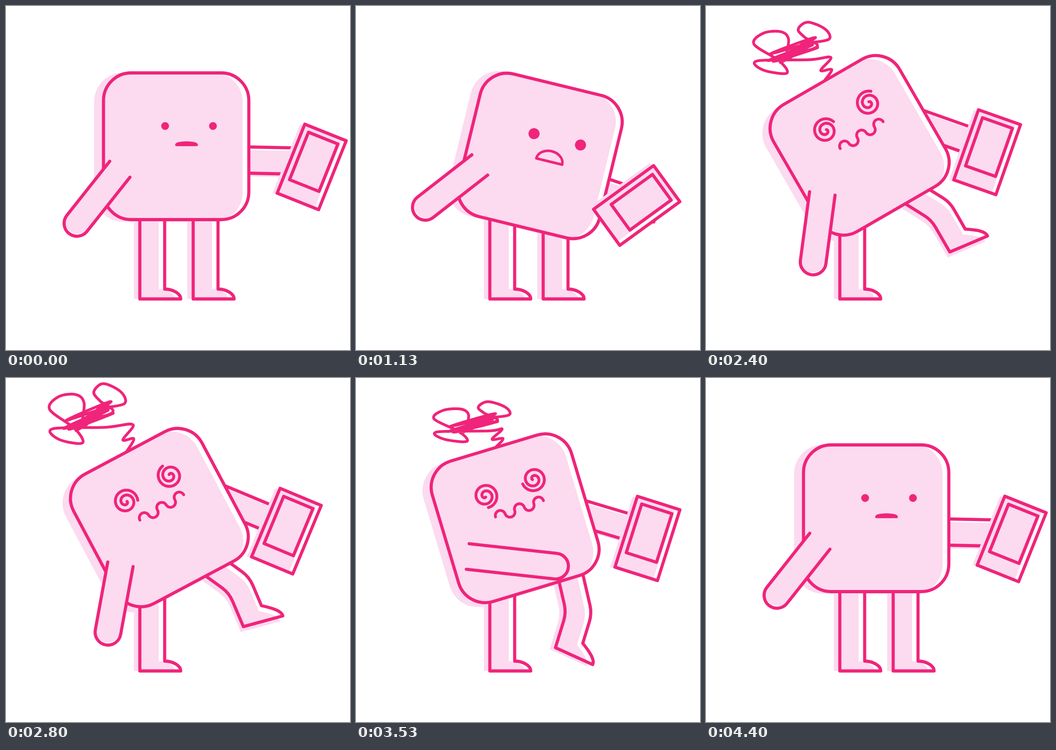
An HTML page with a canvas for the animation above (6140 ms loop, 748 by 748 pixels).

```html
<!DOCTYPE html>
<html lang="en">
<head>
<meta charset="utf-8">
<title>Dizzy</title>
<style>
html, body { margin: 0; height: 100%; overflow: hidden; background: #fff; }
canvas { display: block; }
</style>
</head>
<body>
<canvas id="stage" width="748" height="748"></canvas>
<script>
const c = document.getElementById('stage').getContext('2d');
const INK = '#f0247a', TINT = '#fcdaf0', RAD = Math.PI / 180, TAU = 2 * Math.PI;
const LOOP = 6140, LAST = 44;

// Body x, y, tilt | far arm height, angle, reach, grip | near arm angle |
// knee x, y, thigh angle, bend | eye radius | tangle height
const rest  = [370, 305, 0,        30, 1.2, 138.5, 20.6,  128.4,  434, 550, 0, 0,     8.5, 0];
const look  = [400, 326, 13.7,     42, 5, 74, 35.3,       128.4,  434, 550, 0, 0,     12, 0];
const reel  = [313.5, 287.5, -31,  -6, -39.2, 85.5, 37.2, 128,    449, 538, -11, 0,   17, .92];
const kick  = [334, 303, -30,      46, 49.4, 130, 0,      127.6,  510, 446, -58, 28,  26, .86];
const sway  = [333.5, 303.5, -28,  49, 50.6, 129.3, 0,    128.4,  507, 450, -54, 31,  26, 1];
const swing = [346, 305, -16.7,    41, 33.3, 135, 1,      23,     485, 511, -13, 30,  26, .67];
const acts = [[0, rest], [6, look], [14, look], [19, reel], [24, kick], [28, sway], [35, swing], [43, rest]];

const mix = (a, b, k) => a + (b - a) * k;
const clamp = x => Math.max(0, Math.min(1, x));
const turn = (x, y, deg) => {
  const s = Math.sin(deg * RAD), k = Math.cos(deg * RAD);
  return [x * k - y * s, x * s + y * k];
};

// Smooth interpolation that never overshoots a key pose
function poseAt(t) {
  if (t >= acts.at(-1)[0]) return rest;
  const i = acts.findLastIndex(a => a[0] <= t);
  const h = acts[i + 1][0] - acts[i][0], u = (t - acts[i][0]) / h;
  return rest.map((_, j) => {
    const slope = k => (acts[k + 1][1][j] - acts[k][1][j]) / (acts[k + 1][0] - acts[k][0]);
    const tangent = k => {
      if (k < 1 || k > acts.length - 2) return 0;
      const p = slope(k - 1), q = slope(k);
      return p * q > 0 ? 2 * p * q / (p + q) : 0;
    };
    return mix(acts[i][1][j], acts[i + 1][1][j], u * u * (3 - 2 * u)) +
      h * u * (1 - u) * ((1 - u) * tangent(i) - u * tangent(i + 1));
  });
}

function place(x, y, deg, draw) {
  c.save();
  c.translate(x, y);
  c.rotate(deg * RAD);
  draw();
  c.restore();
}

function fill(path, dx = 0, dy = 0, color = TINT) {
  c.fillStyle = color;
  place(dx, dy, 0, () => c.fill(path));
}

function line(path, width = 6.8) {
  c.lineWidth = width;
  c.stroke(path);
}

function box(x, y, w, h, r = 0) {
  const p = new Path2D();
  p.roundRect(x - w / 2, y - h / 2, w, h, r);
  return p;
}

// Tangle: a zigzag stem, two loops on the left, a random core, one loop on the right
let seed = 7;
const random = () => (seed = seed * 16807 % 2147483647) / 2147483647;
const core = Array.from({ length: 15 }, (_, i) => {
  const side = i % 2 ? 1 : -1;
  return [-80 + side * mix(15, 60, random()), -76 - side * mix(5, 30, random()) + mix(-12, 12, random())];
});
const tangle = [
  [0, 0], [16, -28], [-8, -26], [14, -59], [-47, -53],
  [-160, -50], [-147, -27], [-96, -19], [-112, -50],
  [-167, -92], [-147, -120], [-109, -124], [-92, -105],
  ...core, [-30, -86],
  [-57, -110], [-71, -130], [-50, -148], [-12, -130], [-4, -105], [-47, -96]];

function drawTangle(height) {
  if (height < .05) return;
  const wide = Math.min(1, height * 1.5), path = new Path2D();
  const p = tangle.map(([x, y], i) => [x * wide + (i > 3 ? (1 - height) * 100 * wide : 0), y * height]);
  path.moveTo(...p[0]);
  p.slice(0, -1).forEach((b, i) => {
    const a = p[i - 1] || b, d = p[i + 1], e = p[i + 2] || d;
    path.bezierCurveTo(b[0] + (d[0] - a[0]) / 6, b[1] + (d[1] - a[1]) / 6,
      d[0] - (e[0] - b[0]) / 6, d[1] - (e[1] - b[1]) / 6, ...d);
  });
  line(path, 6);
}

function drawLeg(x, y, thigh, bend) {
  const shin = thigh + bend, half = 27, knee = half / Math.cos(bend / 2 * RAD);
  const heel = turn(-half, 87, shin);
  const foot = (fx, fy) => turn(fx, fy, shin + bend / 4).map((v, i) => v + heel[i]);
  const ankle = turn(half, 65.5 - bend / 6, shin);
  const hip = turn(half, -160, thigh);
  const p = new Path2D();
  p.moveTo(...turn(-half, -160, thigh));
  p.arcTo(...turn(-knee, 0, thigh + bend / 2), ...heel, 70);
  p.lineTo(...heel);
  p.lineTo(...foot(89, 0));
  p.bezierCurveTo(...foot(89, -11), ...foot(74, -21), ...ankle);
  p.arcTo(...turn(knee, 0, thigh + bend / 2), ...hip, 70);
  p.lineTo(...hip);
  place(x, y, 0, () => {
    fill(p, ...turn(-13, 0, thigh * 1.2));
    line(p);
  });
}

function drawFarArm(y, deg) {
  const half = 28.5 / Math.cos(deg * RAD), [dx, dy] = turn(118, 0, deg);
  const p = new Path2D();
  p.moveTo(0, -half);
  p.lineTo(dx, dy - half);
  p.lineTo(dx, dy + half);
  p.lineTo(0, half);
  place(157, y, 0, () => {
    fill(p, 0, 7);
    line(p);
  });
}

function drawPhone(y, deg, reach, grip) {
  const [dx, dy] = turn(reach, 0, deg + 5), shell = box(0, 0, 97, 161.5);
  place(157 + dx, y + dy, deg + grip, () => {
    fill(shell, 0, 0, '#fff');
    fill(shell, -9.5, 3.5);
    line(shell);
    line(box(0, -12, 69, 111));
  });
}

function drawNearArm(deg) {
  const length = mix(192, 150, (deg - 23) / 105.4);
  const arm = len => {
    const p = new Path2D();
    p.moveTo(0, -28);
    p.lineTo(len, -28);
    p.arc(len, 0, 28, -TAU / 4, TAU / 4);
    p.lineTo(0, 28);
    return p;
  };
  place(-122.5, 50, deg, () => {
    fill(arm(length - 5), 0, 2);
    line(arm(length));
  });
}

function spiral(x, y, r, deg) {
  const p = new Path2D();
  for (let u = 0; u <= 1; u += 1 / 80) {
    const [dx, dy] = turn(r * (1 - .9 * u ** 1.4), 0, deg - 720 * u);
    p.lineTo(x + dx, y + dy);
  }
  line(p, mix(3, 6.2, r / 26));
}

function drawFace(t, eye) {
  const mouth = new Path2D(), spread = clamp((eye - 14) / 12), open = clamp((eye - 8.5) / 3.5);
  const left = [mix(-24, -48, spread), mix(-44, -65, spread)];
  const right = [mix(80, 63, spread), mix(-44, -70, spread)];
  if (eye > 13) {
    spiral(...left, eye, 10 * (t - 24) - 18);
    spiral(...right, eye, -12.6 * (t - 24) - 49);
    for (let i = 0; i < 5; i++)
      mouth.arc(-29 + 22 * i, -15 - i, 11, TAU / 2, 0, i % 2 === 1);
    line(mouth, 6);
    return;
  }
  for (const spot of [left, right]) {
    const p = new Path2D();
    p.arc(...spot, eye, 0, TAU);
    fill(p, 0, 0, INK);
  }
  mouth.ellipse(22.5, mix(-3, 7, open), mix(22, 29, open), mix(5, 23, open), 0, TAU / 2, TAU);
  mouth.closePath();
  line(mouth, 5.5);
}

function draw(t) {
  const [x, y, tilt, armY, armDeg, reach, grip, nearDeg, kneeX, kneeY, thigh, bend, eye, height] = poseAt(t);
  const shape = box(0, 0, 316, 319, 60), shade = box(-17, 2, 323, 324, 63);
  const [topX, topY] = turn(4, -160, tilt);
  c.fillStyle = '#fff';
  c.fillRect(0, 0, 748, 748);
  c.strokeStyle = INK;
  c.lineCap = c.lineJoin = 'round';

  place(x + topX, y + topY, 0, () => drawTangle(height));
  place(x, y, tilt, () => {
    fill(shade);
    drawFarArm(armY, armDeg);
  });
  drawLeg(318, 550, 0, 0);
  drawLeg(kneeX, kneeY, thigh, bend);
  place(x, y, tilt, () => {
    c.save();
    c.clip(shape);
    fill(shape, 0, 0, '#fff');
    fill(shade);
    c.restore();
    line(shape);
    drawFace(t, eye);
    drawNearArm(nearDeg);
    drawPhone(armY, armDeg, reach, grip);
  });
}

// Poses change in uneven beats: 130 ms, then 70 ms
function tick(now) {
  const ms = now % LOOP;
  draw(Math.min(LAST, 2 * Math.floor(ms / 200) + (ms % 200 >= 130 ? 1 : 0)));
  requestAnimationFrame(tick);
}
draw(0);
requestAnimationFrame(tick);
</script>
</body>
</html>
```
